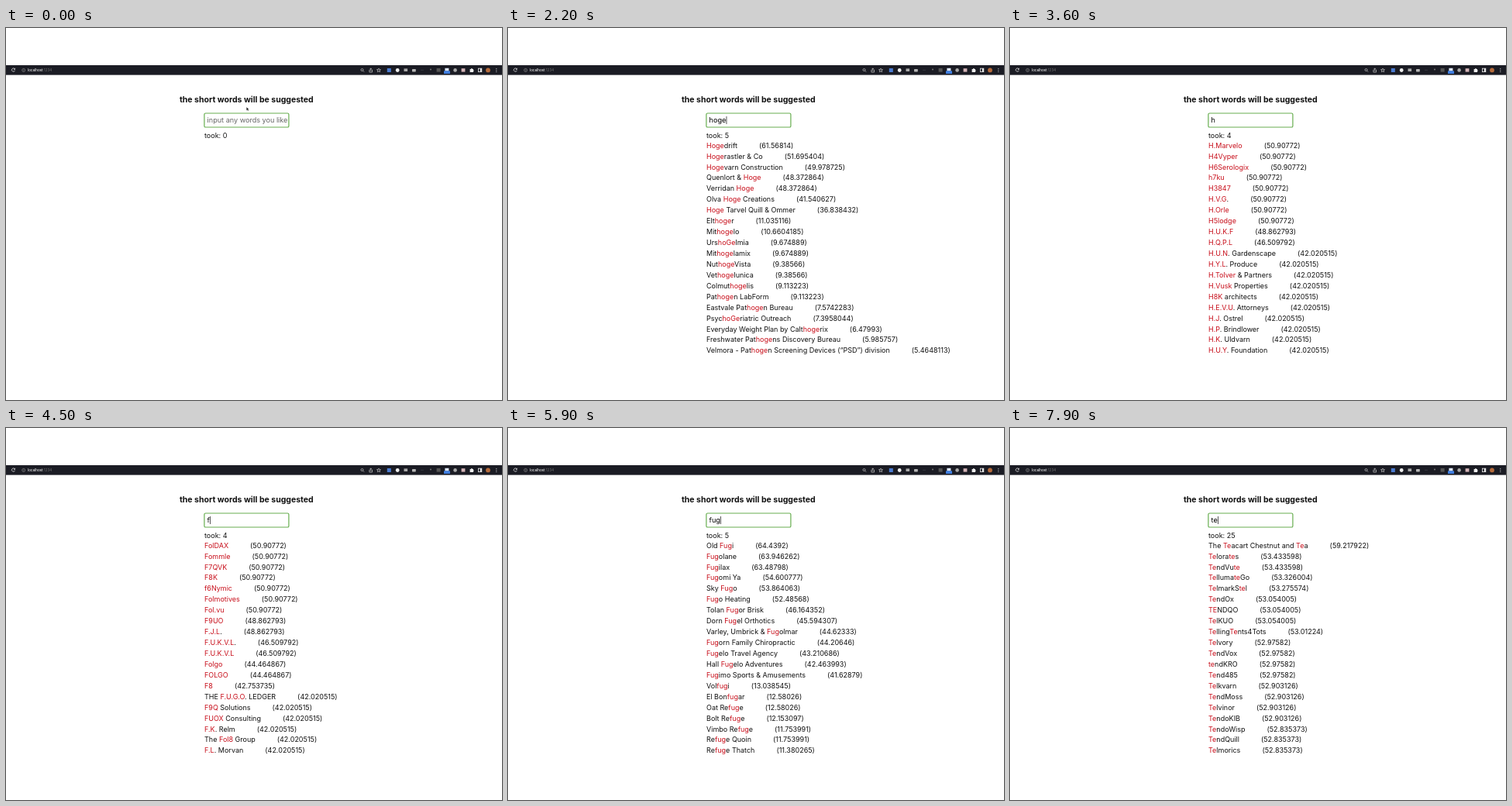
Write an HTML page that moves like this. It is 640 px wide and 480 px high and loops after 8 s.

```html
<!DOCTYPE html>
<html lang="en">
<head>
<meta charset="utf-8">
<title>Word suggestions</title>
<style>
html, body { margin: 0; width: 100%; height: 100%; overflow: hidden; background: #fff; }
svg { display: block; width: 640px; height: 480px; font: 9px Inter, "Liberation Sans", sans-serif; fill: #111; }
text { white-space: pre; }
.hit { fill: #c8101c; }
</style>
</head>
<body>
<svg id="stage" viewBox="0 0 640 480">
  <rect y="48" width="640" height="12.6" fill="#1b1c24"/>
  <g id="bar">
    <path d="M11 52.6a2.1 2.1 0 1 0 .5 2.2M11.6 51.8v1.6h-1.6" fill="none" stroke="#ddd" stroke-width=".8"/>
    <circle cx="22.7" cy="54.4" r="2" fill="none" stroke="#999" stroke-width=".6"/>
    <path d="M22.7 54.2v1.3M22.7 53v.5" stroke="#999" stroke-width=".6"/>
    <text x="28" y="56" font-size="4.5" font-weight="500" fill="#eee">localhost<tspan fill="#777" font-weight="400">:1234</tspan></text>
    <g fill="none" stroke="#ccc" stroke-width=".7">
      <circle cx="459.5" cy="54" r="1.5"/>
      <path d="M460.7 55.2l1.4 1.5M469.7 54h-.8v3h3.6v-3h-.8M470.7 55.5v-3.6M469.6 53l1.1-1.1 1.1 1.1"/>
      <path d="M481 52l.7 1.6 1.8.1-1.4 1.2.5 1.8-1.6-1-1.6 1 .5-1.8-1.4-1.2 1.8-.1z"/>
    </g>
    <rect x="491.8" y="52" width="5" height="5" fill="#4b7bd0"/>
    <circle cx="505.2" cy="54.5" r="2.4" fill="#eee"/>
    <rect x="513.5" y="52.4" width="4.6" height="3.6" fill="#aaa"/>
    <rect x="524" y="53" width="4.8" height="3.4" rx=".6" fill="#b5b5b5"/>
    <rect x="535" y="53.8" width="4" height="1" fill="#34353d"/>
    <circle cx="548" cy="53.6" r="1" fill="#777"/>
    <rect x="555.6" y="52" width="5" height="4.6" fill="#555"/>
    <rect x="566.4" y="51.8" width="5" height="4" fill="#dde6f5"/>
    <rect x="565" y="55.2" width="8" height="3.8" rx=".6" fill="#3f7ee0"/>
    <circle cx="579.6" cy="54.4" r="2.3" fill="#aaa"/>
    <rect x="587.6" y="52.2" width="4.8" height="4.4" fill="#d5b5b8"/>
    <path d="M598.6 53h1.4a.9.9 0 0 1 1.8 0h1.2v1.3a.9.9 0 0 1 0 1.7v1h-4.4z" fill="#eee"/>
    <rect x="609.6" y="52.2" width="4.2" height="4.4" fill="none" stroke="#eee" stroke-width=".8"/>
    <rect x="611.8" y="52.2" width="2" height="4.4" fill="#eee"/>
    <circle cx="622" cy="54.4" r="2.9" fill="#b56b3c"/>
    <g fill="#ddd"><circle cx="632.8" cy="52.5" r=".6"/><circle cx="632.8" cy="54.5" r=".6"/><circle cx="632.8" cy="56.5" r=".6"/></g>
  </g>
  <text x="310.3" y="95.8" text-anchor="middle" font-size="10.5" font-weight="700">the short words will be suggested</text>
  <rect x="255.9" y="110" width="109" height="18" rx="1.6" fill="#fff" stroke="#68ae50" stroke-width="1.2"/>
  <text id="field" x="259.6" y="122.2" font-size="9.1"></text>
  <rect id="caret" y="114" width=".7" height="10" fill="#111"/>
  <text id="took" x="256" y="142.2"></text>
  <g id="rows"></g>
  <path id="arrow" d="M0 0v4.6l1.1-1 .7 1.6.8-.4-.7-1.5h1.4z" fill="#000" stroke="#fff" stroke-width=".3"/>
  <path id="beam" d="M-1 -3h2M0 -3v6M-1 3h2" fill="none" stroke="#111" stroke-width=".6"/>
</svg>
<script>
const LOOP = 8000, BLINK = 400;

const lists = {
  hoge: `Hogedrift|61.56814
Hogerastler & Co|51.695404
Hogevarn Construction|49.978725
Quenlort & Hoge|48.372864
Verridan Hoge|48.372864
Olva Hoge Creations|41.540627
Hoge Tarvel Quill & Ommer|36.838432
Elthoger|11.035116
Mithogelo|10.6604185
UrshoGelmia|9.674889
Mithogelamix|9.674889
NuthogeVista|9.38566
Vethogelunica|9.38566
Colmuthogelis|9.113223
Pathogen LabForm|9.113223
Eastvale Pathogen Bureau|7.5742283
PsychoGeriatric Outreach|7.3958044
Everyday Weight Plan by Calthogerix|6.47993
Freshwater Pathogens Discovery Bureau|5.985757
Velmora - Pathogen Screening Devices (“PSD”) division|5.4648113`,
  h: `H.Marvelo|50.90772
H4Vyper|50.90772
H6Serologix|50.90772
h7ku|50.90772
H3847|50.90772
H.V.G.|50.90772
H.Orle|50.90772
H5lodge|50.90772
H.U.K.F|48.862793
H.Q.P.L|46.509792
H.U.N. Gardenscape|42.020515
H.Y.L. Produce|42.020515
H.Tolver & Partners|42.020515
H.Vusk Properties|42.020515
H8K architects|42.020515
H.E.V.U. Attorneys|42.020515
H.J. Ostrel|42.020515
H.P. Brindlower|42.020515
H.K. Uldvarn|42.020515
H.U.Y. Foundation|42.020515`,
  f: `FolDAX|50.90772
Fommle|50.90772
F7QVK|50.90772
F8K|50.90772
f6Nymic|50.90772
Folmotives|50.90772
Fol.vu|50.90772
F9UO|48.862793
F.J.L.|48.862793
F.U.K.V.L.|46.509792
F.U.K.V.L|46.509792
Folgo|44.464867
FOLGO|44.464867
F8|42.753735
THE F.U.G.O. LEDGER|42.020515
F9Q Solutions|42.020515
FUOX Consulting|42.020515
F.K. Relm|42.020515
The Fol8 Group|42.020515
F.L. Morvan|42.020515`,
  fug: `Old Fugi|64.4392
Fugolane|63.946262
Fugilax|63.48798
Fugomi Ya|54.600777
Sky Fugo|53.864063
Fugo Heating|52.48568
Tolan Fugor Brisk|46.164352
Dorn Fugel Orthotics|45.594307
Varley, Umbrick & Fugolmar|44.62333
Fugorn Family Chiropractic|44.20646
Fugelo Travel Agency|43.210686
Hall Fugelo Adventures|42.463993
Fugimo Sports & Amusements|41.62879
Volfugi|13.038545
El Bonfugar|12.58026
Oat Refuge|12.58026
Bolt Refuge|12.153097
Vimbo Refuge|11.753991
Refuge Quoin|11.753991
Refuge Thatch|11.380265`,
  te: `The Teacart Chestnut and Tea|59.217922
Telorates|53.433598
TendVute|53.433598
TellumateGo|53.326004
TelmarkStel|53.275574
TendOx|53.054005
TENDQO|53.054005
TelKUO|53.054005
TellingTents4Tots|53.01224
Telvory|52.97582
TendVox|52.97582
tendKRO|52.97582
Tend485|52.97582
Telkvarn|52.903126
TendMoss|52.903126
Telvinor|52.903126
TendoKIB|52.903126
TendoWisp|52.835373
TendQuill|52.835373
Telmorics|52.835373`
};

// time, typed text, list, highlighted query, took
const steps = [
  [0, '', '', '', 0],
  [1600, 'h', '', '', 0],
  [1800, 'ho', 'h', 'h', 4],
  [1900, 'hog', 'hoge', 'ho', 5],
  [2000, 'hoge', 'hoge', 'hog', 5],
  [2200, 'hoge', 'hoge', 'hoge', 5],
  [2800, 'hog', 'hoge', 'hog', 5],
  [3000, 'ho', 'hoge', 'ho', 5],
  [3200, 'h', 'h', 'h', 4],
  [4000, '', '', '', 0],
  [4300, 'f', '', '', 0],
  [4500, 'f', 'f', 'f', 4],
  [5000, 'fu', 'f', 'f', 4],
  [5200, 'fu', 'fug', 'fu', 5],
  [5600, 'fug', 'fug', 'fu', 5],
  [5900, 'fug', 'fug', 'fug', 5],
  [6300, 'fuga', 'fug', 'fug', 5],
  [6500, 'fug', 'fug', 'fug', 5],
  [6700, 'fu', 'fug', 'fu', 5],
  [6900, 'f', 'f', 'f', 4],
  [7100, '', '', '', 0],
  [7200, 't', '', '', 0],
  [7500, 't', 'te', 't', 25],
  [7700, 'te', 'te', 't', 25],
  [7900, 'te', 'te', 'te', 25]
];

const $ = id => document.getElementById(id);
const show = (el, on) => el.setAttribute('visibility', on ? 'visible' : 'hidden');
const escape = s => s.replace(/&/g, '&amp;');

// A single letter matches whole words, a longer query matches anywhere.
function mark(name, query) {
  const pattern = query.length === 1 ? `\\b${query}(?:[\\w.]*\\w)?` : query;
  return escape(name).replace(new RegExp(pattern, 'gi'), '<tspan class="hit">$&</tspan>');
}

function rowsFor(list, query) {
  if (!list) return '';
  return lists[list].split('\n').map((line, i) => {
    const [name, score] = line.split('|');
    const y = (154.7 + i * 13.93).toFixed(2);
    return `<text x="256" y="${y}">${mark(name, query)}<tspan dx="28">(${score})</tspan></text>`;
  }).join('');
}

let current = null;
function setStep(step) {
  if (step === current) return;
  current = step;
  const [, typed, list, query, took] = step;
  const field = $('field');
  field.textContent = typed || 'input any words you like';
  field.setAttribute('fill', typed ? '#000' : '#666');
  $('caret').setAttribute('x', 259.9 + (typed ? field.getComputedTextLength() : 0));
  $('took').textContent = 'took: ' + took;
  $('rows').innerHTML = rowsFor(list, query);
}

function draw(t) {
  const step = steps.findLast(s => s[0] <= t);
  setStep(step);
  const focusTime = step[0] || 900;
  show($('caret'), t >= focusTime && (t - focusTime) % (2 * BLINK) < BLINK);

  const p = Math.min(1, Math.max(0, (t - 100) / 700));
  const y = 102 + 16 * p * p * (3 - 2 * p);
  const inside = y > 110, pointing = t < 1600;
  for (const id of ['arrow', 'beam']) $(id).setAttribute('transform', `translate(310.3 ${y})`);
  show($('arrow'), pointing && !inside);
  show($('beam'), pointing && inside);
}

const start = performance.now();
function tick() {
  draw((performance.now() - start) % LOOP);
  requestAnimationFrame(tick);
}
tick();
</script>
</body>
</html>
```
